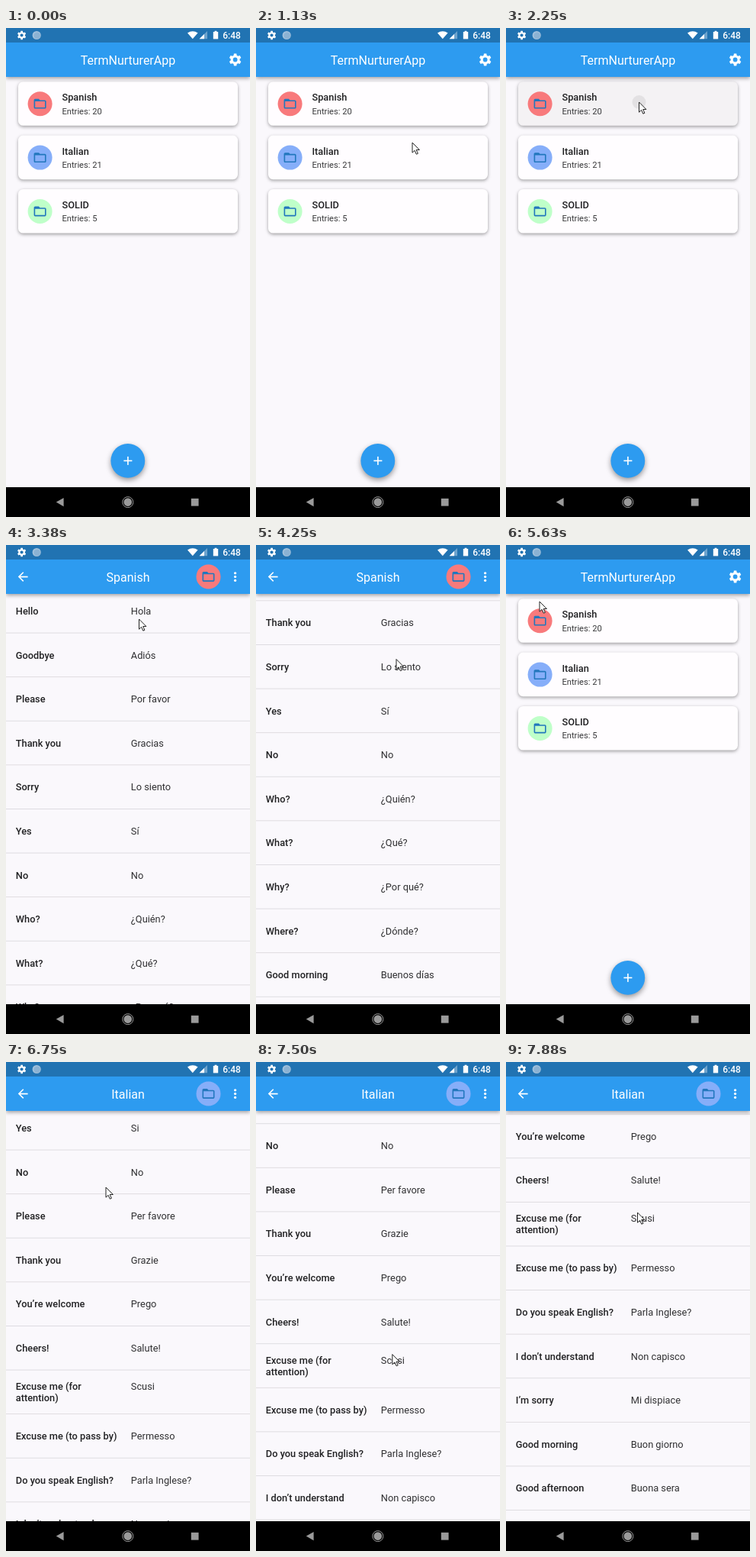
Animation, 320 px wide and 640 px high, one loop 8000 ms. Source, as an HTML page with a canvas:

```html
<!DOCTYPE html>
<html lang="en">
<head>
<meta charset="utf-8">
<title>Vocabulary app</title>
<style>
html, body { margin: 0; width: 100%; height: 100%; overflow: hidden; background: #000; }
canvas { display: block; width: 320px; height: 640px; }
</style>
</head>
<body>
<canvas id="stage"></canvas>
<script>
const W = 320, H = 640, LOOP = 8000, STEP = 125;
const BAR = 64, NAV = 601, ROW = 57.6;
const BLUE = '#2d9bf0', PAPER = '#faf8fc', INK = '#212123';
const FONT = 'Roboto, "Noto Sans", sans-serif';

const canvas = document.getElementById('stage');
const ratio = window.devicePixelRatio || 1;
canvas.width = W * ratio;
canvas.height = H * ratio;
const ctx = canvas.getContext('2d');

const folderPath = new Path2D('M20 6h-8l-2-2H4c-1.1 0-2 .9-2 2v12c0 1.1.9 2 2 2h16c1.1 0 2-.9 2-2V8c0-1.1-.9-2-2-2zm0 12H4V8h16v10z');
const backPath = new Path2D('M20 11H7.83l5.59-5.59L12 4l-8 8 8 8 1.41-1.41L7.83 13H20v-2z');
const pointerPath = new Path2D('M0 0V13.2L3.1 10.3L5.3 15.2L7.4 14.3L5.2 9.5H9.4Z');

const decks = [
  { name: 'Spanish', count: 20, color: '#f87a7c', rows: [
    ['Hello', 'Hola'], ['Goodbye', 'Adiós'], ['Please', 'Por favor'],
    ['Thank you', 'Gracias'], ['Sorry', 'Lo siento'], ['Yes', 'Sí'], ['No', 'No'],
    ['Who?', '¿Quién?'], ['What?', '¿Qué?'], ['Why?', '¿Por qué?'],
    ['Where?', '¿Dónde?'], ['Good morning', 'Buenos días'],
    ['Good afternoon', 'Buenas tardes'], ['Good night', 'Buenas noches']] },
  { name: 'Italian', count: 21, color: '#86aef9', rows: [
    ['Yes', 'Si'], ['No', 'No'], ['Please', 'Per favore'], ['Thank you', 'Grazie'],
    ['You’re welcome', 'Prego'], ['Cheers!', 'Salute!'],
    ['Excuse me (for|attention)', 'Scusi'], ['Excuse me (to pass by)', 'Permesso'],
    ['Do you speak English?', 'Parla Inglese?'], ['I don’t understand', 'Non capisco'],
    ['I’m sorry', 'Mi dispiace'], ['Good morning', 'Buon giorno'],
    ['Good afternoon', 'Buona sera'], ['Good night', 'Buona notte']] },
  { name: 'SOLID', count: 5, color: '#bfffc9', rows: [] }
];

// Keyframes: time, then values
const pointerKeys = [
  [625, 290, 250], [1125, 205, 150], [1625, 205, 150], [2000, 174.5, 97],
  [3375, 174.5, 97], [3750, 190, 307], [3875, 190, 307], [4250, 184, 149.5],
  [4500, 180, 115], [4875, 22, 42], [5375, 22, 42], [5625, 44, 74],
  [6000, 131, 164], [6750, 131, 164], [7125, 180, 417], [7375, 180, 417],
  [7875, 172.5, 197]
];
const scrollKeys = [
  [[3875, 0], [4250, 157.4], [4750, 205]],
  [[7375, 0], [7875, 219.7]]
];
const presses = [
  { deck: 0, from: 2200, to: 2700, x: 174.5, y: 97 },
  { deck: 1, from: 6125, to: 6575, x: 131, y: 164 }
];
const visits = [
  { deck: 0, open: 2500, close: 5000 },
  { deck: 1, open: 6375, close: Infinity }
];
const TRANSITION = 375;

const clamp = v => Math.max(0, Math.min(1, v));
const smooth = p => p * p * (3 - 2 * p);
const easeOut = p => 1 - (1 - p) ** 3;

function sample(keys, t) {
  if (t <= keys[0][0]) return keys[0].slice(1);
  const i = keys.findIndex(k => k[0] > t);
  if (i < 0) return keys[keys.length - 1].slice(1);
  const a = keys[i - 1], b = keys[i];
  const p = smooth((t - a[0]) / (b[0] - a[0]));
  return a.slice(1).map((v, j) => v + (b[j + 1] - v) * p);
}

function text(str, x, y, size, weight = 400, color = INK, align = 'left') {
  ctx.font = `${weight} ${size}px ${FONT}`;
  ctx.textAlign = align;
  ctx.fillStyle = color;
  ctx.fillText(str, x, y);
}

function disc(x, y, r, color) {
  ctx.fillStyle = color;
  ctx.beginPath();
  ctx.arc(x, y, r, 0, Math.PI * 2);
  ctx.fill();
}

function rect(x, y, w, h, color) {
  ctx.fillStyle = color;
  ctx.fillRect(x, y, w, h);
}

function poly(points, color) {
  ctx.fillStyle = color;
  ctx.beginPath();
  points.forEach(p => ctx.lineTo(...p));
  ctx.closePath();
  ctx.fill();
}

function icon(path, x, y, color) {
  ctx.save();
  ctx.translate(x, y);
  ctx.scale(.8, .8);
  ctx.translate(-12, -12);
  ctx.fillStyle = color;
  ctx.fill(path);
  ctx.restore();
}

function withShadow(alpha, blur, dy, draw) {
  ctx.save();
  ctx.shadowColor = `rgba(0,0,0,${alpha})`;
  ctx.shadowBlur = blur * ratio;
  ctx.shadowOffsetY = dy * ratio;
  draw();
  ctx.restore();
}

function gear(x, y, r) {
  ctx.fillStyle = '#fff';
  ctx.beginPath();
  for (let k = 0; k < 6; k++) {
    const mid = Math.PI / 2 + k * Math.PI / 3;
    [[.74, -.36], [1, -.21], [1, .21], [.74, .36]].forEach(([d, a]) =>
      ctx.lineTo(x + r * d * Math.cos(mid + a), y + r * d * Math.sin(mid + a)));
  }
  ctx.closePath();
  ctx.moveTo(x + r * .36, y);
  ctx.arc(x, y, r * .36, 0, Math.PI * 2);
  ctx.fill('evenodd');
}

function badge(x, y, color) {
  disc(x, y, 16, color);
  icon(folderPath, x, y, '#2277bd');
}

function appBar(title) {
  withShadow(.36, 5, 2, () => rect(0, 0, W, BAR, BLUE));
  rect(0, 0, W, 19, 'rgba(0,0,0,.26)');
  text(title, 160, 47.6, 16, 400, '#fff', 'center');
}

function card(deck, i, t) {
  const y = 70.2 + i * 70.4;
  ctx.beginPath();
  ctx.roundRect(16, y, 288, 57.6, 6.4);
  ctx.fillStyle = '#fffdff';
  withShadow(.36, 4, 1.6, () => ctx.fill());

  const press = presses.find(p => p.deck === i && t >= p.from && t < p.to);
  if (press) {
    ctx.save();
    ctx.clip();
    rect(16, y, 288, 58, 'rgba(0,0,0,.045)');
    disc(press.x, press.y, 6.5 + (t - press.from) * .05 + Math.max(0, t - press.from - 60) ** 1.4 * .04, 'rgba(0,0,0,.07)');
    ctx.restore();
  }
  badge(44.6, y + 29, deck.color);
  text(deck.name, 73.4, y + 24.9, 12.8, 500);
  text('Entries: ' + deck.count, 73.4, y + 42.4, 11.2, 400, '#39393b');
}

function homePage(t) {
  rect(0, 0, W, NAV, PAPER);
  decks.forEach((deck, i) => card(deck, i, t));
  appBar('TermNurturerApp');
  gear(300.6, 41.5, 8.1);
  withShadow(.4, 7, 3, () => disc(159.8, 566.4, 22.4, BLUE));
  rect(154.4, 565.6, 11, 1.6, '#fff');
  rect(159.1, 560.9, 1.6, 11, '#fff');
}

function deckPage(index, t) {
  const deck = decks[index];
  const scroll = sample(scrollKeys[index], t)[0];
  rect(0, 0, W, NAV, PAPER);
  deck.rows.forEach(([term, meaning], i) => {
    const mid = 86.3 + i * ROW - scroll;
    const lines = term.split('|');
    const base = mid + 4.6 - (lines.length - 1) * 7.5;
    lines.forEach((line, j) => text(line, 12.8, base + j * 15, 12.8, 500));
    text(meaning, 163.8, base, 12.8, 400, '#303032');
    rect(0, mid + 28.3, W, .9, '#dcdade');
  });
  appBar(deck.name);
  icon(backPath, 22.2, 41.6, '#fff');
  badge(265.5, 41.5, deck.color);
  for (let k = -1; k <= 1; k++) disc(300.6, 41.6 + k * 4.8, 1.65, '#fff');
}

function zoomed(scale, alpha, draw) {
  ctx.save();
  ctx.globalAlpha = alpha;
  ctx.translate(160, NAV / 2);
  ctx.scale(scale, scale);
  ctx.translate(-160, -NAV / 2);
  ctx.beginPath();
  ctx.rect(0, 0, W, NAV);
  ctx.clip();
  draw();
  ctx.restore();
}

function pages(t) {
  const visit = visits.find(v => t >= v.open && t < v.close + TRANSITION);
  if (!visit) return homePage(t);
  const page = () => deckPage(visit.deck, t);
  if (t < visit.close) {
    const p = clamp((t - visit.open) / TRANSITION);
    if (p < 1) {
      homePage(t);
      rect(0, 0, W, NAV, `rgba(0,0,0,${.3 * p})`);
    }
    zoomed(.85 + .15 * easeOut(p), clamp(p * 3), page);
  } else {
    const p = clamp((t - visit.close) / TRANSITION);
    homePage(t);
    zoomed(1 - .1 * easeOut(p), clamp(1 - p * 2), page);
  }
}

function systemBars() {
  gear(20.6, 9.5, 5.8);
  disc(40.2, 9.5, 5.6, '#9fc0dc');
  disc(40.8, 10, 4.2, '#8bb2d3');

  ctx.fillStyle = '#fff';
  ctx.beginPath();
  ctx.moveTo(244.8, 14.2);
  ctx.lineTo(238, 6.6);
  ctx.quadraticCurveTo(244.8, 1.8, 251.6, 6.6);
  ctx.fill();
  poly([[264, 4], [264, 14.2], [253.6, 14.2]], 'rgba(255,255,255,.35)');
  poly([[260, 8], [260, 14.2], [253.6, 14.2]], '#fff');
  rect(271.8, 5, 6.4, 9.4, '#fff');
  rect(273.6, 3.8, 2.8, 1.6, '#fff');
  text('6:48', 284.2, 13.6, 12, 500, '#fff');

  rect(0, NAV, W, H - NAV, '#000');
  const gray = '#9a9a9a';
  poly([[65.8, 620.6], [75.6, 615], [75.6, 626.2]], gray);
  disc(159.8, 620.6, 5.3, gray);
  ctx.strokeStyle = gray;
  ctx.lineWidth = 1;
  ctx.beginPath();
  ctx.arc(159.8, 620.6, 7, 0, Math.PI * 2);
  ctx.stroke();
  rect(242.8, 615.8, 9.8, 9.8, gray);
}

function pointer(t) {
  if (t < pointerKeys[0][0]) return;
  ctx.save();
  ctx.translate(...sample(pointerKeys, t));
  ctx.fillStyle = '#fff';
  ctx.strokeStyle = '#222';
  ctx.lineWidth = 1;
  ctx.fill(pointerPath);
  ctx.stroke(pointerPath);
  ctx.restore();
}

const start = performance.now();

function frame() {
  const t = Math.floor(((performance.now() - start) % LOOP) / STEP) * STEP;
  ctx.setTransform(ratio, 0, 0, ratio, 0, 0);
  pages(t);
  systemBars();
  pointer(t);
  requestAnimationFrame(frame);
}
frame();
</script>
</body>
</html>
```
